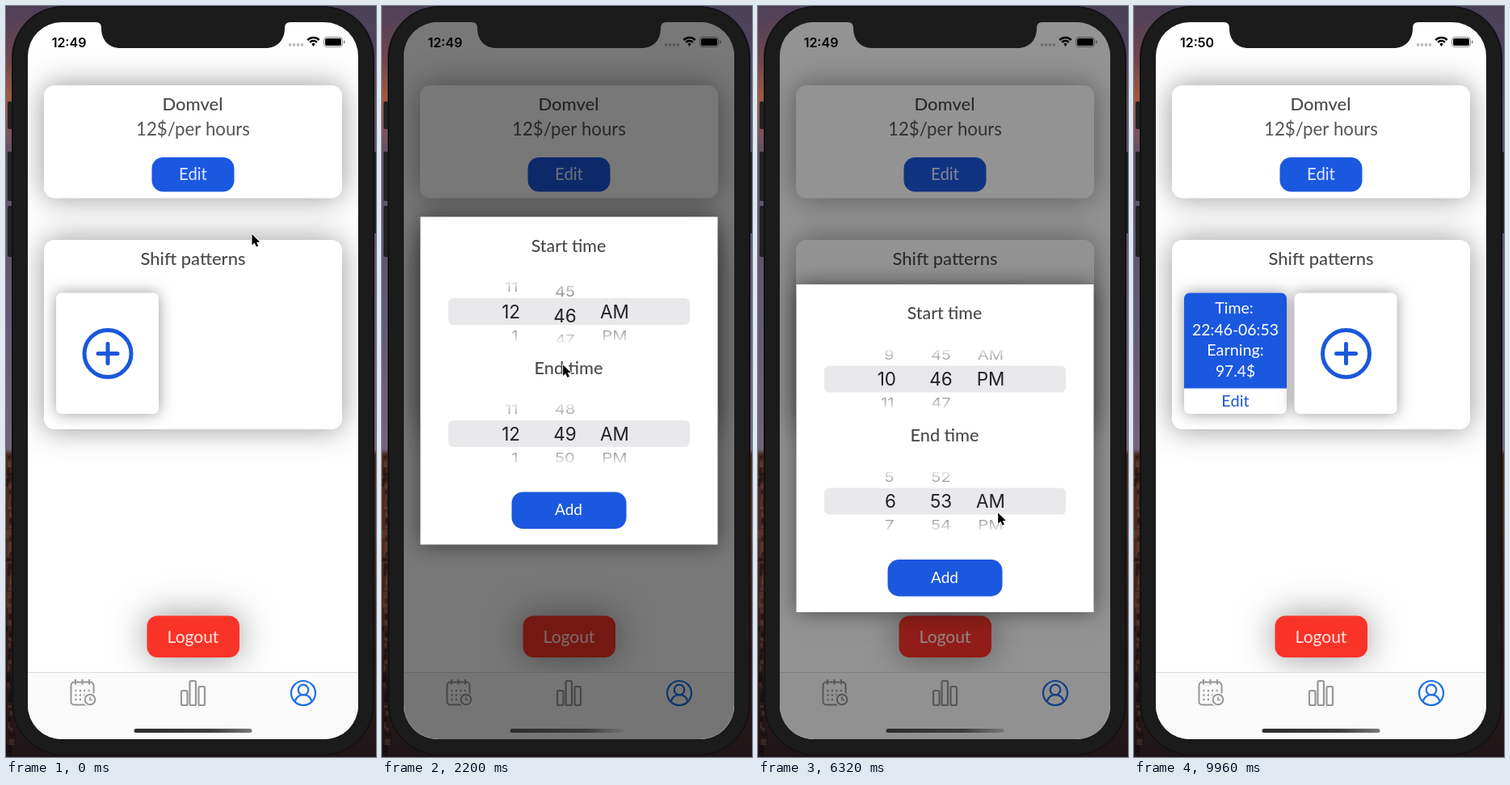
Animation of 458x928 px, one loop 10000 ms. Source, as an HTML page with a canvas:

```html
<!DOCTYPE html>
<html lang="en">
<head>
<meta charset="utf-8">
<title>Shift patterns</title>
<style>
html, body { margin: 0; width: 100%; height: 100%; overflow: hidden; background: #1b1b1b; }
canvas { display: block; width: 458px; height: 928px; }
</style>
</head>
<body>
<canvas id="stage" width="458" height="928"></canvas>
<script>
const ctx = document.getElementById('stage').getContext('2d');
const LOOP = 10000, STEP = 40, W = 458, H = 928;
const BLUE = '#1b58e0', INK = '#4a4a4c';
const OPEN = 1000, CLOSE = 6240, OPEN_TIME = 532, CLOSE_TIME = 362, NEXT_MINUTE = 9200;
const MODAL_TOP = 260, MODAL_TRAVEL = 668, DIM = 0.53;

// Keyframes: [time, value, value...]
const startHour = [[2500, 12], [3400, 9.45], [3520, 9.58], [3760, 10]];
const startMinute = [[1640, 49], [2160, 45.8], [2360, 46]];
const startHalf = [[2640, 0], [2900, 1]];
const endHour = [[3960, 12], [4340, 15], [4500, 15], [4880, 18]];
const endMinute = [[5080, 49], [5560, 52.7], [5640, 52.94], [5720, 53]];
const endHalf = [[0, 0]];
const cursorPath = [
  [160, 304, 281], [760, 128, 432], [1040, 128, 432], [1280, 197, 392],
  [1600, 224, 352], [2160, 226, 446], [2460, 178, 372], [3400, 193, 472],
  [3540, 193, 472], [3920, 168, 552], [4340, 170, 462], [4520, 168, 555],
  [4880, 172, 462], [5060, 230, 548], [5560, 243, 433], [5640, 243, 433],
  [6060, 236, 620], [6260, 236, 620], [6440, 470, 640]
];

const clamp = x => Math.min(1, Math.max(0, x));
const smooth = x => x * x * (3 - 2 * x);
const progress = (t, start, length) => clamp((t - start) / length);

function track(keys, t, i = 1) {
  if (t <= keys[0][0]) return keys[0][i];
  for (let k = 1; k < keys.length; k++) {
    const a = keys[k - 1], b = keys[k];
    if (t < b[0]) return a[i] + (b[i] - a[i]) * smooth((t - a[0]) / (b[0] - a[0]));
  }
  return keys[keys.length - 1][i];
}

function box(x, y, w, h, r, fill) {
  ctx.beginPath();
  ctx.roundRect(x, y, w, h, r);
  ctx.fillStyle = fill;
  ctx.fill();
}

function frameBox(x, y, w, h, r, color, width) {
  ctx.beginPath();
  ctx.roundRect(x, y, w, h, r);
  ctx.strokeStyle = color;
  ctx.lineWidth = width;
  ctx.stroke();
}

function shadowBox(x, y, w, h, r, fill, blur, alpha) {
  ctx.save();
  ctx.shadowColor = `rgba(0,0,0,${alpha})`;
  ctx.shadowBlur = blur;
  box(x, y, w, h, r, fill);
  ctx.restore();
}

// y is the middle of the capital letters
function label(text, x, y, size, color, weight = 400, family = 'Lato', align = 'center') {
  ctx.font = `${weight} ${size}px ${family}, sans-serif`;
  ctx.textAlign = align;
  ctx.fillStyle = color;
  ctx.fillText(text, x, y + size * 0.36);
}

function line(color, width, ...points) {
  ctx.beginPath();
  points.forEach(([x, y]) => ctx.lineTo(x, y));
  ctx.strokeStyle = color;
  ctx.lineWidth = width;
  ctx.stroke();
}

function ring(x, y, r, color, width, from = 0, to = Math.PI * 2) {
  ctx.beginPath();
  ctx.arc(x, y, r, from, to);
  ctx.strokeStyle = color;
  ctx.lineWidth = width;
  ctx.stroke();
}

function dot(x, y, r, color) {
  ctx.beginPath();
  ctx.arc(x, y, r, 0, Math.PI * 2);
  ctx.fillStyle = color;
  ctx.fill();
}

function gradient(x0, y0, x1, y1, stops) {
  const g = ctx.createLinearGradient(x0, y0, x1, y1);
  stops.forEach(([at, color]) => g.addColorStop(at, color));
  return g;
}

function desktop() {
  const rocks = [[0.597, '#47291f'], [0.7, '#4a2a24'], [0.8, '#38201c'], [1, '#1e1417']];
  ctx.fillStyle = gradient(0, 0, 0, H, [
    [0, '#4c4058'], [0.07, '#6f464f'], [0.12, '#a0583e'], [0.16, '#85545a'],
    [0.2, '#5b5066'], [0.42, '#635a73'], [0.59, '#75647a'], ...rocks
  ]);
  ctx.fillRect(0, 0, W / 2, H);
  ctx.fillStyle = gradient(0, 0, 0, H, [
    [0, '#4a4058'], [0.2, '#5b4e68'], [0.59, '#75647a'], ...rocks
  ]);
  ctx.fillRect(W / 2, 0, W / 2, H);
  let seed = 11;
  const random = () => (seed = seed * 16807 % 2147483647) / 2147483647;
  for (let y = 556; y < H; y += 7) {
    ctx.fillStyle = random() < 0.5 ? 'rgba(15,8,12,.45)' : 'rgba(130,80,60,.3)';
    ctx.fillRect(random() * 5, y, 2 + random() * 5, 3 + random() * 9);
  }
}

function phone() {
  [[118, 34], [180, 61], [247, 63]].forEach(([y, h]) => box(2, y, 8, h, 2, '#202022'));
  box(453, 180, 5, 101, 1, '#202022');
  box(7, 0, 449, 926, 64, '#111112');
  box(9, 1.5, 445, 923, 62, '#1b1b1b');
}

function notch() {
  ctx.beginPath();
  ctx.moveTo(111, 19);
  ctx.lineTo(111, 20);
  ctx.quadraticCurveTo(118, 20, 118, 27);
  ctx.bezierCurveTo(118, 42, 127, 52, 142, 52);
  ctx.lineTo(321, 52);
  ctx.bezierCurveTo(336, 52, 345, 42, 345, 27);
  ctx.quadraticCurveTo(345, 20, 352, 20);
  ctx.lineTo(352, 19);
  ctx.fillStyle = '#1b1b1b';
  ctx.fill();
}

function statusBar(t) {
  label(t < NEXT_MINUTE ? '12:49' : '12:50', 78, 45, 16, '#000', 600, 'Inter');
  for (let i = 0; i < 4; i++) dot(351.5 + i * 5, 48, 1.9, '#bcbcbe');
  const mid = -Math.PI / 2;
  [10, 6].forEach(r => ring(380.5, 49, r, '#000', 2.6, mid - 0.8, mid + 0.8));
  ctx.beginPath();
  ctx.moveTo(380.5, 50);
  ctx.arc(380.5, 49, 3, mid - 0.8, mid + 0.8);
  ctx.fillStyle = '#000';
  ctx.fill();
  frameBox(393.5, 38.5, 23, 12, 3.5, '#8a8a8a', 1);
  box(395, 40, 20, 9, 2, '#000');
  box(418, 42.5, 1.5, 4, 1, '#8a8a8a');
}

function addCard(x) {
  shadowBox(x, 354.5, 127, 149.5, 7, '#fff', 18, 0.4);
  const cx = x + 64, cy = 429.5;
  ring(cx, cy, 29, '#1a58db', 5);
  ctx.lineCap = 'round';
  line('#1a58db', 5, [cx - 12, cy], [cx + 12, cy]);
  line('#1a58db', 5, [cx, cy - 12], [cx, cy + 12]);
  ctx.lineCap = 'butt';
}

function shiftCard() {
  shadowBox(62, 354.5, 127, 149.5, 7, '#fff', 18, 0.4);
  box(62, 354.5, 127, 118, [7, 7, 0, 0], BLUE);
  label('Time:', 124, 373, 19.5, '#fff');
  label('22:46-06:53', 125.5, 400, 19.4, '#fff');
  label('Earning:', 125.5, 425, 19.8, '#fff');
  label('97.4$', 125.5, 451, 19.2, '#fff');
  label('Edit', 125.5, 488, 20, '#1a58db');
}

function tabBar() {
  ctx.fillStyle = '#fafafa';
  ctx.fillRect(27, 823, 409, 83);
  ctx.fillStyle = '#dcdcdc';
  ctx.fillRect(27, 823, 409, 1);

  const gray = '#97979a';
  frameBox(80.5, 835.5, 28, 28, 4, gray, 2);
  [86, 94.5, 103].forEach(x => line(gray, 2, [x, 832], [x, 838.5]));
  for (let row = 0; row < 3; row++)
    for (let col = 0; col < 4; col++) dot(86.5 + col * 5.4, 846 + row * 5.5, 1.2, gray);
  dot(104, 857, 9, '#fafafa');
  ring(104, 857, 6.3, gray, 2);
  line(gray, 1.6, [104, 853.5], [104, 857.5], [107, 857.5]);

  [[217, 846], [227.5, 834], [238.5, 841]].forEach(([x, y]) =>
    frameBox(x, y, 7.5, 864 - y, 1.5, gray, 2.2));

  const blue = '#1f6fe5';
  ring(368, 849, 15, blue, 2.2);
  ring(368, 845, 6.3, blue, 2.2);
  ring(368, 861.5, 10.5, blue, 2.2, Math.PI * 1.06, Math.PI * 1.94);
}

function page(t) {
  ctx.fillStyle = '#fff';
  ctx.fillRect(27, 20, 409, 886);
  shadowBox(47, 98, 369, 139.5, 13, '#fff', 36, 0.41);
  label('Domvel', 231, 121, 22, INK, 500);
  label('12$/per hours', 231.5, 152, 22.2, '#555557');
  box(180.5, 187, 102, 42.5, 14, BLUE);
  label('Edit', 231.5, 208, 20.3, '#e4ebff');

  shadowBox(47, 289, 369, 234, 13, '#fff', 36, 0.41);
  label('Shift patterns', 231.5, 312, 22, INK, 500);
  if (t < CLOSE) addCard(62);
  else {
    shiftCard();
    addCard(198.5);
  }
  shadowBox(174.5, 753.5, 114.5, 51.5, 13, '#fa3329', 44, 0.42);
  label('Logout', 231.5, 779, 21, '#ffe8e4');
  tabBar();
  statusBar(t);
}

// One wheel column drawn on a cylinder
function wheel(value, name, x, cy, align, big) {
  const size = big ? 22.5 : 20.3, radius = 48, step = 0.67;
  for (let i = Math.floor(value) - 1; i <= Math.ceil(value) + 1; i++) {
    const text = name(i), angle = (i - value) * step;
    if (!text || Math.abs(angle) > 1.4) continue;
    ctx.save();
    ctx.translate(x, cy + radius * Math.sin(angle));
    ctx.scale(1, Math.cos(angle));
    label(text, 0, 0, size, big ? '#222224' : '#666668', 400, 'Inter', align);
    ctx.restore();
  }
}

const hourName = i => String((i + 11) % 12 + 1);
const minuteName = i => String((i + 60) % 60).padStart(2, '0');
const halfName = i => ['AM', 'PM'][i];

function picker(cy, hour, minute, half) {
  box(82, cy - 16.5, 299, 33, 6, '#e9e9eb');
  const clipped = (y, h, big) => {
    ctx.save();
    ctx.beginPath();
    ctx.rect(82, y, 299, h);
    ctx.clip();
    wheel(hour, hourName, big ? 171 : 168.5, cy, 'right', big);
    wheel(minute, minuteName, 226.5, cy, 'center', big);
    wheel(half, halfName, 288, cy, 'center', big);
    ctx.restore();
  };
  clipped(cy - 16.5, 33, true);
  [-1, 1].forEach(side => {
    const top = side < 0 ? cy - 50 : cy + 16.5;
    clipped(top, 33.5, false);
    ctx.fillStyle = gradient(0, cy + side * 16.5, 0, cy + side * 41, [
      [0, 'rgba(255,255,255,.15)'], [0.5, 'rgba(255,255,255,.55)'], [1, '#fff']
    ]);
    ctx.fillRect(82, top, 299, 33.5);
  });
}

function modal(t) {
  if (t < OPEN || t > CLOSE + CLOSE_TIME) return;
  const entering = Math.pow(1 - progress(t, OPEN, OPEN_TIME), 3);
  const leaving = smooth(progress(t, CLOSE, CLOSE_TIME));
  const fade = (1 - entering) * (1 - smooth(progress(t, CLOSE, 280)));
  ctx.fillStyle = `rgba(0,0,0,${DIM * fade})`;
  ctx.fillRect(27, 20, 409, 886);

  const y = MODAL_TOP + MODAL_TRAVEL * Math.max(entering, leaving);
  const stretch = 45 * entering;
  shadowBox(47.5, y + 0.5, 368, 405 + stretch, 0, '#fff', 26, 0.5);
  label('Start time', 231, y + 36, 21.3, INK, 500);
  picker(y + 117.5, track(startHour, t), track(startMinute, t), track(startHalf, t));
  label('End time', 231, y + 187, 21.7, INK, 500);
  picker(y + 268.5, track(endHour, t), track(endMinute, t), track(endHalf, t));
  const buttonTop = y + 340.5 + stretch * 0.15;
  box(160.5, buttonTop, 142, 45.5, 14, BLUE);
  label('Add', 231, buttonTop + 22, 19, '#fff');
}

function homeBar() {
  box(158.5, 893, 146, 5, 2.5, gradient(158, 0, 304, 0, [
    [0, '#2b2b2b'], [0.65, '#3c3c3c'], [1, '#777']
  ]));
}

function cursor(t) {
  if (t >= 6440) return;
  ctx.save();
  ctx.translate(track(cursorPath, t) + 0.5, track(cursorPath, t, 2) + 1);
  ctx.scale(0.9, 0.9);
  ctx.beginPath();
  [[0, 0], [0, 15], [3.4, 11.8], [6, 17.2], [8.6, 16], [6.2, 10.8], [10.8, 10.8]]
    .forEach(([x, y]) => ctx.lineTo(x, y));
  ctx.closePath();
  ctx.lineJoin = 'round';
  ctx.strokeStyle = '#fff';
  ctx.lineWidth = 2;
  ctx.stroke();
  ctx.fillStyle = '#000';
  ctx.fill();
  ctx.restore();
}

function draw(t) {
  desktop();
  phone();
  ctx.save();
  ctx.beginPath();
  ctx.roundRect(27, 20, 409, 886, 42);
  ctx.clip();
  page(t);
  modal(t);
  homeBar();
  ctx.restore();
  notch();
  cursor(t);
}

// The picture advances in 40 ms steps; the small lead absorbs timer jitter.
const begin = performance.now();
function frame() {
  const elapsed = performance.now() - begin + 8;
  draw(Math.floor(elapsed / STEP) * STEP % LOOP);
  requestAnimationFrame(frame);
}
frame();
</script>
</body>
</html>
```
